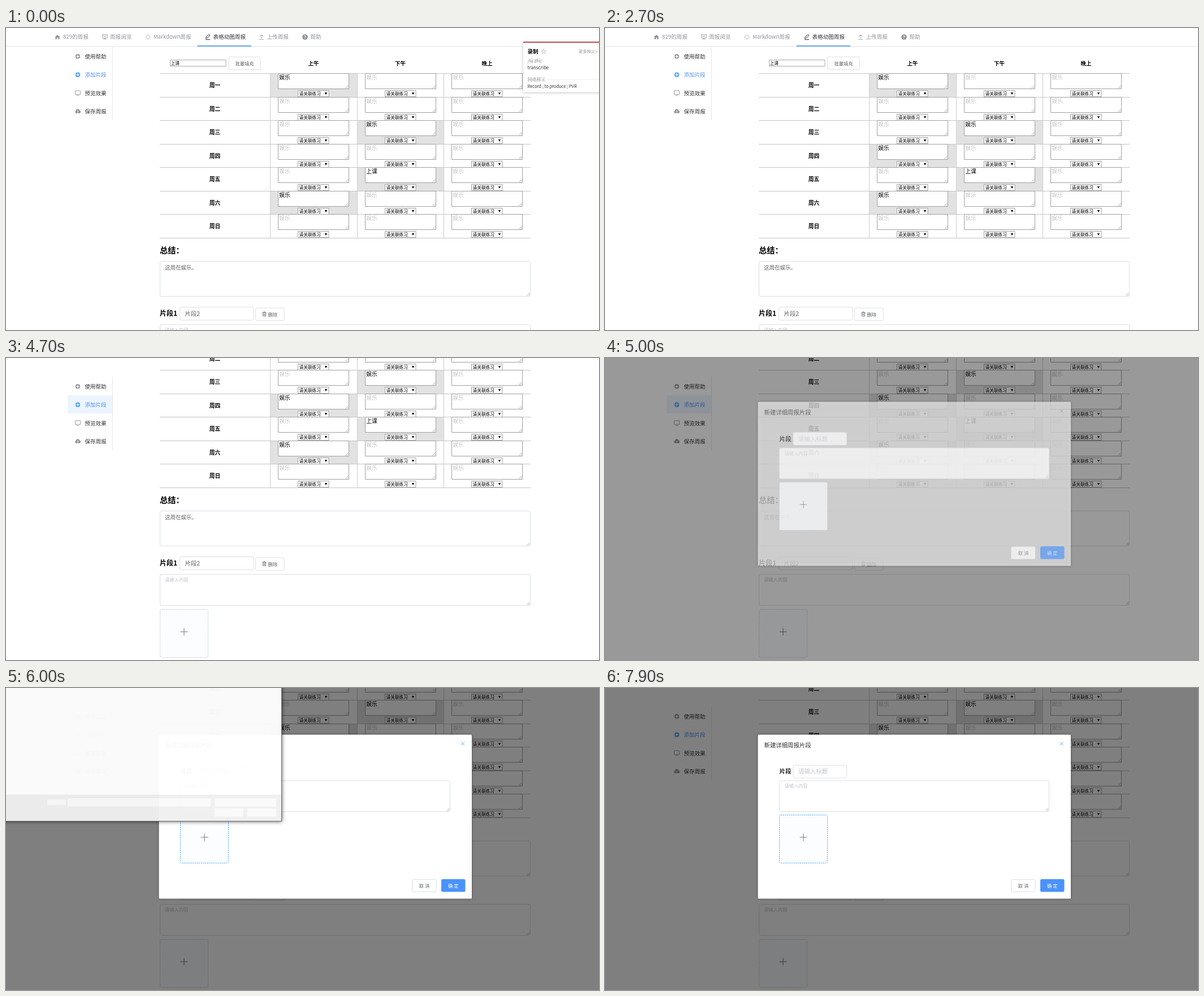
An HTML page with a canvas that plays this animation: 1049 by 534 pixels, repeating every 8 s.

```html
<!DOCTYPE html>
<html lang="zh-CN">
<head>
<meta charset="utf-8">
<title>周报</title>
<style>
  html, body { margin: 0; width: 100%; height: 100%; overflow: hidden; background: #fff; }
  canvas { display: block; }
</style>
</head>
<body>
<canvas id="stage" width="1049" height="534"></canvas>
<script>
const stage = document.getElementById('stage').getContext('2d');
const sheet = Object.assign(document.createElement('canvas'), { width: 510, height: 260 }).getContext('2d');
let ctx = stage;
const W = 1049, H = 534, LOOP = 8000;
const FONT = '"Noto Sans CJK SC", "Noto Sans CJK", "Noto Sans", sans-serif';
const BLUE = '#409eff', BORDER = '#dcdfe6', HINT = '#c0c4cc', GREY = '#909399', INK = '#606265';
const clamp = v => Math.max(0, Math.min(1, v));

// ---------- helpers ----------
function text(str, x, y, size, color = '#000', { bold = false, align = 'left' } = {}) {
  ctx.font = `${bold ? 700 : 400} ${size}px ${FONT}`;
  ctx.textBaseline = 'middle';
  ctx.textAlign = align;
  ctx.fillStyle = color;
  ctx.fillText(str, x, y);
}
function fill(x, y, w, h, color) {
  ctx.fillStyle = color;
  ctx.fillRect(x, y, w, h);
}
function box(x, y, w, h, { bg = '#fff', border = BORDER, radius = 0, dash = [], line = 1 } = {}) {
  ctx.beginPath();
  ctx.roundRect(x, y, w, h, radius);
  if (bg) { ctx.fillStyle = bg; ctx.fill(); }
  if (!border) return;
  ctx.setLineDash(dash);
  ctx.lineWidth = line;
  ctx.strokeStyle = border;
  ctx.stroke();
  ctx.setLineDash([]);
}
function path(color, width, ...lines) {
  ctx.beginPath();
  for (const [x, y, ...rest] of lines) {
    ctx.moveTo(x, y);
    for (let i = 0; i < rest.length; i += 2) ctx.lineTo(rest[i], rest[i + 1]);
  }
  ctx.strokeStyle = color;
  ctx.lineWidth = width;
  ctx.stroke();
}
function shape(color, ...points) {
  ctx.beginPath();
  for (let i = 0; i < points.length; i += 2) ctx.lineTo(points[i], points[i + 1]);
  ctx.fillStyle = color;
  ctx.fill();
}
function disc(x, y, r, color) {
  ctx.beginPath();
  ctx.arc(x, y, r, 0, 7);
  ctx.fillStyle = color;
  ctx.fill();
}
function layer(alpha, dy, draw) {
  ctx.save();
  ctx.globalAlpha *= alpha;
  ctx.translate(0, dy);
  draw();
  ctx.restore();
}
function shadowed(blur, color, draw) {
  ctx.save();
  ctx.shadowColor = color;
  ctx.shadowBlur = blur;
  draw();
  ctx.restore();
}
const grip = (x, y) => path('#888', .7, [x - 6, y - 1, x - 1, y - 6], [x - 3, y - 1, x - 1, y - 3]);
const plus = (x, y) => path('#777', 1, [x - 6.5, y, x + 6.5, y], [x, y - 6.5, x, y + 6.5]);

function uploadBox(x, y, color) {
  box(x, y, 85, 85, { bg: '#fbfdff', border: color, radius: 3, dash: [2, 1.4] });
  plus(x + 42.5, y + 39.5);
}

// ---------- icons ----------
const icons = {
  home(x, y, c) {
    shape(c, x - 4.5, y, x, y - 4, x + 4.5, y, x + 3.5, y, x + 3.5, y + 4, x + 1.2, y + 4,
      x + 1.2, y + 1, x - 1.2, y + 1, x - 1.2, y + 4, x - 3.5, y + 4, x - 3.5, y);
  },
  board(x, y, c) {
    path(c, .9, [x - 5, y - 4, x + 5, y - 4], [x - 4, y - 4, x - 4, y + 2, x + 4, y + 2, x + 4, y - 4],
      [x - 2, y + 5, x, y + 2, x + 2, y + 5], [x - 2, y - 1, x + 2, y - 1]);
  },
  rays(x, y, c) {
    for (let i = 0; i < 8; i++) {
      const a = i * Math.PI / 4, u = Math.cos(a), v = Math.sin(a);
      path(c, .9, [x + u * 2.3, y + v * 2.3, x + u * 4.7, y + v * 4.7]);
    }
  },
  pen(x, y, c) {
    path(c, 1, [x - 3.5, y + 2.5, x - 3, y, x + 2, y - 4.5, x + 4, y - 2.8, x - 1, y + 2, x - 3.5, y + 2.5],
      [x - 4, y + 4.5, x + 4, y + 4.5]);
  },
  upload(x, y, c) {
    path(c, .9, [x - 4, y + 4, x + 4, y + 4], [x, y + 2, x, y - 4], [x - 3, y - 1, x, y - 4, x + 3, y - 1]);
  },
  help(x, y, c) {
    disc(x, y, 4.8, c);
    text('?', x, y, 7.5, '#fff', { bold: true, align: 'center' });
  },
  ring(x, y, c) {
    ctx.beginPath();
    ctx.arc(x, y, 3.1, 0, 7);
    ctx.strokeStyle = c;
    ctx.lineWidth = 2.4;
    ctx.stroke();
    path('#ffffffb0', .8, [x - 4.5, y, x - 2, y], [x + 2, y, x + 4.5, y], [x, y - 4.5, x, y - 2], [x, y + 2, x, y + 4.5]);
  },
  screen(x, y, c) {
    path(c, .9, [x - 4.5, y - 4, x + 4.5, y - 4, x + 4.5, y + 2.5, x - 4.5, y + 2.5, x - 4.5, y - 4],
      [x - 2.5, y + 4.5, x + 2.5, y + 4.5]);
  },
  cloud(x, y, c) {
    disc(x - 2, y + 1, 2.6, c); disc(x + 2.3, y + 1, 2.6, c); disc(x, y - 1, 3, c);
    path('#fff', .8, [x, y + 3, x, y - 1], [x - 1.5, y + .5, x, y - 1, x + 1.5, y + .5]);
  },
};

// ---------- page ----------
const NAV = [['home', 91, 101, '829的周报'], ['board', 175, 184, '周报阅览'], ['rays', 251, 261, 'Markdown周报'],
  ['pen', 357, 366.5, '表格动图周报'], ['upload', 452, 461.5, '上传周报'], ['help', 529, 538.5, '帮助']];
const MENU = [['ring', '使用帮助'], ['ring', '添加片段'], ['screen', '预览效果'], ['cloud', '保存周报']];
const ROW = 41.53, TOP = 80.5, COL = 153.5;

function drawNav() {
  for (const [icon, iconX, x, label] of NAV) {
    const color = icon === 'pen' ? '#303133' : GREY;
    icons[icon](iconX, 16, color);
    text(label, x, 15.5, 9.6, color);
  }
  fill(0, 32, W, 1, '#e6e6e6');
  fill(338.5, 31, 95.5, 1.5, '#3f8de0');
}

function drawTable(filled) {
  box(290.5, 56.5, 98.5, 11, { border: '#a9a9a9' });
  text('上课', 291.5, 62, 7.7);
  box(394, 51, 56, 22.5, { radius: 2.5 });
  text('批量填充', 422, 62.5, 8.3, INK, { align: 'center' });
  ['上午', '下午', '晚上'].forEach((s, i) =>
    text(s, 544 + i * COL, 62, 9.5, '#000', { bold: true, align: 'center' }));

  [...'一二三四五六日'].forEach((day, r) => {
    const y = Math.round(TOP + r * ROW - .5) + .5;
    text('周' + day, 369.5, y + 21, 9.7, '#000', { bold: true, align: 'center' });
    for (let c = 0; c < 3; c++) {
      const left = Math.floor(467.5 + c * COL) + .5;
      if (filled[r + ',' + c]) fill(left, y, COL, ROW, '#e2e2e2');
      path('#ccc', 1, [left, y, left, y + ROW]);
    }
    path('#c4c4c4', 1, [272, y, 928, y]);
    for (let c = 0; c < 3; c++) {
      const value = filled[r + ',' + c], x = Math.floor(481.5 + c * COL) + .5;
      box(x, y, 125, 27, { border: '#a0a0a0' });
      grip(x + 125, y + 27);
      text(value || '娱乐', x + 1.7, y + 6.8, 9.8, value ? '#000' : '#c6c6c6');
      box(x + 35, y + 30, 54.5, 11, { border: '#a0a0a0' });
      text('请关联练习', x + 37, y + 36, 7.7);
      shape('#000', x + 82.3, y + 33.5, x + 86.7, y + 33.5, x + 84.5, y + 37.5);
    }
  });
  path('#c4c4c4', 1, [272, 371.5, 928, 371.5]);
}

function drawSections() {
  text('总结：', 272, 393, 14.2, '#000', { bold: true });
  box(272.5, 412.5, 655, 62, { radius: 2.5 });
  grip(927.5, 474.5);
  text('这周在娱乐。', 281, 423, 9.5, INK);
  text('片段1', 272, 504.5, 12, '#000', { bold: true });
  box(307.5, 493.5, 130.5, 23, { radius: 2.5 });
  text('片段2', 316.5, 505, 10.4, INK);
  box(441.5, 495, 50.5, 22.5, { radius: 2.5 });
  path(INK, .8, [453.5, 503.5, 460.5, 503.5], [455.5, 503, 455.5, 502, 458.5, 502, 458.5, 503],
    [454.5, 503.5, 454.5, 509.5, 459.5, 509.5, 459.5, 503.5], [456.3, 505, 456.3, 508], [457.8, 505, 457.8, 508]);
  text('删除', 463.5, 506.5, 8.3, INK);
  box(272.5, 524.5, 655, 55, { radius: 2.5 });
  grip(927.5, 579.5);
  text('请输入内容', 281, 534, 8.3, HINT);
  uploadBox(272.5, 586.5, '#c0ccda');
}

function drawMenu(hover) {
  layer(hover, 0, () => fill(109, 66, 80, 32, '#ecf5ff'));
  path('#e6e6e6', 1, [188.5, 33, 188.5, 163]);
  MENU.forEach(([icon, label], i) => {
    const y = 50.3 + i * 32.3, active = i === 1;
    icons[icon](127, y, active ? BLUE : GREY);
    text(label, 139.5, y, 9.5, active ? '#4d90f0' : '#303133');
  });
}

function drawPopup(expanded) {
  shadowed(5, '#0004', () => fill(915, 25, 140, 88.5, '#fff'));
  if (expanded) fill(915, 7, 134, 19, '#b5282d');
  fill(915, 24.5, 134, 1.5, '#b5282d');
  text('录制', 922.5, 41.5, 9.5, '#000', { bold: true });
  text('☆', 946, 41.5, 10.5, '#888');
  text('更多释义»', 1046, 41, 7.4, '#999', { align: 'right' });
  text('/lù zhì/', 922.5, 57.5, 8, '#777');
  text('transcribe', 922.5, 70, 8, '#333');
  text('网络释义', 922.5, 91, 8, '#999');
  fill(957, 90, 92, 1, '#eee');
  text('Record ; to produce ; PVR', 922.5, 103.5, 7.5, '#333');
}

// ---------- new section dialog ----------
function drawModal(uploadHover, focused) {
  shadowed(4, '#0006', () => box(270.5, 82.5, 553.5, 290, { border: null, radius: 1.5 }));
  text('新建详细周报片段', 281.5, 101, 10.4, '#303133');
  path(focused ? '#5fa0dc' : GREY, .9, [805, 95.5, 811, 101.5], [811, 95.5, 805, 101.5]);
  text('片段', 308.5, 147.5, 10.5, '#222', { bold: true });
  box(333, 136.5, 94.5, 22.5, { radius: 2.5 });
  text('请输入标题', 342, 147.5, 10.4, HINT);
  box(308.5, 164, 477, 54.5, { radius: 2.5 });
  grip(785.5, 218.5);
  text('请输入内容', 317.5, 173.3, 8.2, HINT);
  uploadBox(308.5, 224.5, uploadHover ? BLUE : '#c0ccda');
  box(718.5, 338.5, 42.5, 22, { radius: 2.5 });
  text('取 消', 740, 349.5, 8.3, INK, { align: 'center' });
  box(770, 338, 42.5, 22.5, { bg: '#4a93fb', border: null, radius: 2.5 });
  text('确 定', 791.2, 349.5, 8.3, '#fff', { align: 'center' });
}

// ---------- file picker ----------
const FOLDERS = ['研究生毕设', '共享盘-二号', 'Lab', 'mo', '.ssh', '书', 'ipv6download', 'zhoubao', '电子书', '开发素材'];
const PLACES = [['3D 对象', '#2aa6d6'], ['视频', '#44546a'], ['图片', '#5aa9e0']];
const FILES = [['badge-large.pn', 'g'], ['love.jpg'], ['love1.jpg'], ['richtext.png'], ['richtext-large', '.png'], ['菜单栏.png']];

function folderIcon(x, y) {
  fill(x, y - 4.5, 4, 2, '#e8bd4f');
  fill(x, y - 3.8, 8, 8, '#ffdc7c');
}

function drawTree() {
  FOLDERS.forEach((name, i) => {
    const y = 2 + i * 13.8;
    if (i === 1) {
      fill(18, y - 4, 8, 6, '#4aa3df');
      fill(18, y + 2, 4, 3, '#e8bd4f');
    } else folderIcon(17.5, y);
    text(name, 28.5, y, 7.2);
    if (i < 6) path('#777', .9, [70.5, y + 3, 73, y + .5],
      [72, y - 1, 75, y + 1.8], [73, y - .8, 75, y - 3, 76.5, y - 1.2, 74.3, y + .8]);
  });
  box(12, 140.5, 9, 6, { bg: '#35a8e0', border: '#2b7fb0', line: .7 });
  fill(14, 148, 5, 1, '#555');
  text('此电脑', 24, 144.5, 7.2);
  fill(0, 179.5, 79, 9, '#d9d9d9');
  PLACES.forEach(([name, color], i) => {
    const y = 158.3 + i * 13.9;
    fill(17.5, y - 4, 8, 8, color);
    fill(19.5, y - 2, 4, 4, '#ffffff90');
    text(name, 28.5, y, 7.2);
  });
  fill(79, 0, 9, 188.5, '#f0f0f0');
  fill(79, 59, 9, 72, '#cdcdcd');
  path('#505050', 1, [81.5, 2, 83.5, 0, 85.5, 2], [81.5, 183, 83.5, 185, 85.5, 183]);
}

function gradient(x0, y0, x1, y1, ...stops) {
  const g = ctx.createLinearGradient(x0, y0, x1, y1);
  stops.forEach((c, i) => g.addColorStop(i / (stops.length - 1), c));
  return g;
}
function drawSunset() {
  fill(167, 23, 52, 30, gradient(0, 23, 0, 53, '#d9e6ea', '#f8dfae', '#f0ae58', '#6d8797'));
  shape('#b9683b', 167, 43, 179, 34, 187, 29, 193, 34, 199, 29, 207, 34, 219, 43, 219, 49, 205, 42, 194, 47, 181, 42, 167, 49);
  shape('#ffeab0', 187, 35, 193, 38, 199, 35, 193, 44);
}
function drawHands() {
  fill(231, 18, 53, 35, gradient(231, 0, 284, 0, '#a9bdb9', '#7d9aa0'));
  shape('#d9ab8c', 231, 41, 246, 36, 258, 38, 262, 42, 250, 45, 231, 49);
  shape('#c78f70', 284, 19, 284, 27, 272, 36, 262, 45, 257, 41, 264, 33, 276, 24);
}
function drawScreenshot() {
  fill(425, 20, 53, 33, '#f0f2f4');
  fill(425, 20, 53, 6, '#172b45');
  fill(426, 28, 13, 9, '#111');
  for (let i = 0; i < 6; i++) fill(443 + i % 3 * 11.5, 28 + (i > 2) * 12, 9, 9, '#d3d8de');
}

function drawFiles(selected, hovered) {
  if (selected) box(163.5, -3, 60, 69, { bg: '#cce8ff', border: '#99d1ff' });
  else if (hovered === 1) fill(163, 0, 61, 66, '#e5f3ff');
  if (hovered === 2) fill(228, 0, 60, 66, '#e5f3ff');
  fill(102, 1, 52, 52, '#000');
  disc(128, 27, 23.5, '#e5532d');
  drawSunset();
  drawHands();
  fill(299, 27, 47, 26, '#f8284f');
  fill(360, 24, 53, 29, '#f8284f');
  drawScreenshot();
  FILES.forEach((lines, i) => lines.forEach((s, k) =>
    text(s, 128.5 + i * 64.6, 60 + k * 10, 7.2, '#000', { align: 'center' })));
}

function drawControls(selected) {
  text('文件名(N):', 106, 202, 7.2, '#000', { align: 'right' });
  box(109.5, 195.5, 252.5, 14, { border: '#7a7a7a' });
  if (selected) text('love.jpg', 111.5, 202.5, 7.2);
  box(369.5, 195.5, 107.5, 14, { bg: '#e3e3e3', border: '#adadad' });
  text('所有文件 (*.*)', 371, 202.5, 7.2);
  path('#555', .9, [355, 201.5, 357, 203.5, 359, 201.5], [470.5, 201.5, 472.5, 203.5, 474.5, 201.5]);
  box(370, 214, 48.5, 13, { bg: '#e1e1e1', border: '#0078d7', line: 1.5 });
  text('打开(O)', 394.5, 220.5, 7.2, '#000', { align: 'center' });
  box(427.5, 213.5, 49.5, 13.5, { bg: '#e1e1e1', border: '#adadad' });
  text('取消', 452, 220.5, 7.2, '#000', { align: 'center' });
  path('#aaa', .8, [481, 234, 486, 229], [484, 234, 486, 232]);
}

function drawEmptyControls() {
  fill(73, 197, 33, 10, '#fafafa');
  fill(109, 195, 253, 14.5, '#fafafa');
  fill(369, 195, 109, 14.5, '#fafafa');
  fill(369, 212.5, 51, 15, '#fafafa');
  fill(426.5, 212.5, 51.5, 15, '#fafafa');
}

function drawPicker(step) {
  shadowed(7, '#000a', () => fill(-20, -20, 507.5, 255.5, '#fff'));
  fill(0, 188.5, 487.5, 47, '#f0f0f0');
  path('#646464', 1, [487.5, 0, 487.5, 235.5, 0, 235.5]);
  if (step < 61) return drawEmptyControls();
  const selected = step >= 70;
  ctx.save();
  ctx.beginPath();
  ctx.rect(0, 0, 487, 188.5);
  ctx.clip();
  layer(clamp((step - 60) / 3), 0, drawTree);
  layer(clamp((step - 61) / 4), 0, () => drawFiles(selected, step >= 72 ? 2 : step >= 69 ? 1 : 0));
  ctx.restore();
  drawControls(selected);
}

// Painted on its own sheet first, so that the window fades as a whole.
function showPicker(step, alpha) {
  ctx = sheet;
  ctx.clearRect(0, 0, 510, 260);
  drawPicker(step);
  ctx = stage;
  layer(alpha, 0, () => ctx.drawImage(sheet.canvas, 0, 0));
}

// ---------- timeline, in steps of 100 ms ----------
function render(step) {
  const scroll = step < 38 ? 0 : step === 38 ? 3.5 : step === 39 ? 85 : 142;
  const menuHover = step < 38 ? 0 : 1 - clamp((step - 50) / 2);
  const filled = { '0,0': '娱乐', '2,1': '娱乐', '4,1': '上课', '5,0': '娱乐' };
  if (step >= 18) filled['3,0'] = '娱乐';

  fill(0, 0, W, H, '#fff');
  layer(1, -scroll, () => { drawNav(); drawTable(filled); drawSections(); });
  drawMenu(menuHover);
  if (step < 6) drawPopup(step >= 4);

  if (step >= 49) {
    fill(0, 0, W, H, `rgba(0,0,0,${[.16, .4][step - 49] ?? .5})`);
    const shown = [.25, .65, .94][step - 49] ?? 1;
    layer(shown, -14 * (1 - shown), () => drawModal(step >= 55, step >= 52));
  }
  if (step >= 60 && step < 79) showPicker(step, .96 * (1 - clamp((step - 72) / 7) ** 1.3));
}

let lastStep = -1;
function tick() {
  const step = Math.floor(performance.now() % LOOP / 100);
  if (step !== lastStep) render(lastStep = step);
  requestAnimationFrame(tick);
}
tick();
</script>
</body>
</html>
```
